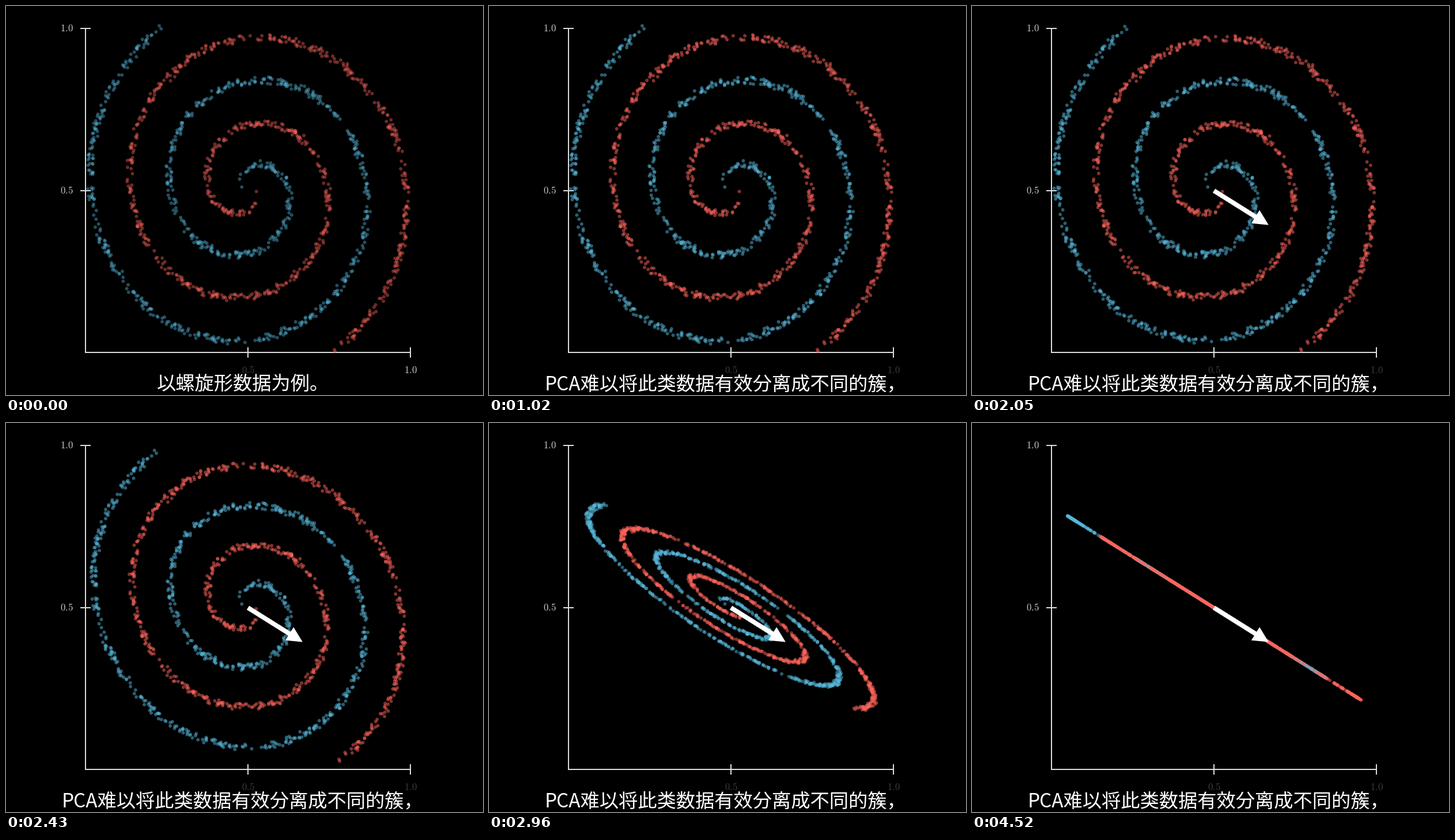
Recreate the animation shown at these times as a matplotlib script. Size 828x676 px, loop 4.58 s.

```python
import numpy as np
import matplotlib.pyplot as plt
from matplotlib.animation import FuncAnimation
from matplotlib.patches import Polygon, Rectangle

W, H, DPI = 828, 676, 64
LOOP, TICK = 4580, 20
PT = 72 / DPI                       # points per pixel
RED, BLUE = "#ff655c", "#58b8dc"
LINE = "#dedede"

plt.rcParams["mathtext.fontset"] = "cm"
fig = plt.figure(figsize=(W / DPI, H / DPI), dpi=DPI, facecolor="black")
ax = fig.add_axes([0, 0, 1, 1])
ax.set_xlim(0, W)
ax.set_ylim(H, 0)
ax.axis("off")

ORIGIN = np.array([420.0, 321.0])
AXIS = np.array([513.0, 322.0])
AXIS /= np.hypot(*AXIS)
NORMAL = np.array([-AXIS[1], AXIS[0]])


def smooth(t):
    """Sigmoid ease from 0 to 1."""
    t = min(max(t, 0.0), 1.0)
    edge = 1 / (1 + np.exp(5))
    return (1 / (1 + np.exp(-10 * (t - 0.5))) - edge) / (1 - 2 * edge)


def spirals(n, seed):
    """Two noisy spiral arms, one the half turn of the other."""
    rng = np.random.default_rng(seed)
    a = np.sqrt(rng.random(n)) * np.radians(780)
    arm = np.column_stack([a * np.cos(a), a * np.sin(a)])
    return [(sign * arm + rng.uniform(-0.25, 0.25, (n, 2))) * [21.8, 23.9]
            + [421, 318] for sign in (1, -1)]


def project(pts, p):
    """Move points the share p of the way onto the main axis."""
    off = (pts - ORIGIN) @ NORMAL
    return pts - p * off[:, None] * NORMAL


def stroke(x0, y0, x1, y1):
    ax.plot([x0, x1], [y0, y1], color=LINE, lw=2 * PT,
            solid_capstyle="projecting", zorder=1)


def label(x, y, s):
    ax.text(x, y, f"${s}$", color="#c8c8c8", fontsize=16.8 * PT,
            ha="center", va="center", zorder=1)


def subtitle(x, s, box_x0, box_x1):
    box = Rectangle((box_x0, 622), box_x1 - box_x0, H - 622,
                    fc="black", alpha=0.7, lw=0, zorder=5)
    ax.add_patch(box)
    text = ax.text(x, 667, s, color="white", fontsize=33.3 * PT,
                   family="Noto Sans CJK JP", va="baseline", zorder=6)
    return box, text


stroke(138, 39, 138, 602)
stroke(138, 602, 702, 602)
for v, s in ((0.5, "0.5"), (1.0, "1.0")):
    x, y = 138 + 564 * v, 602.5 - 563.5 * v
    stroke(130, y, 146, y)
    stroke(x, 594, x, 610)
    label(105, y, s)
    label(x, 632.5, s)

red, blue = spirals(750, 11)
sizes = np.full(len(red), (6 * PT) ** 2)
dots = [(pts, ax.scatter(*pts.T, s=sizes, c=color, lw=0, zorder=z))
        for pts, color, z in ((blue, BLUE, 2), (red, RED, 3))]

# Arrow outline as (along, across) the axis
ARROW = np.array([(0, -4), (85, -4), (85, -13.5), (112, 0),
                  (85, 13.5), (85, 4), (0, 4)])
arrow = Polygon(ORIGIN + ARROW @ [AXIS, NORMAL], fc="white", lw=0, zorder=4)
ax.add_patch(arrow)

first = subtitle(262, "以螺旋形数据为例。", 252, 576)
second = subtitle(97, "PCA难以将此类数据有效分离成不同的簇，", 86, 738)


def update(i):
    step = int((i * TICK + 12) / 128.5)     # the picture holds between steps
    t = step * 129

    p = smooth((t - 1785) / 1900)
    alpha = 0.42 + 0.08 * min(t / 900, 1)
    for pts, cloud in dots:
        cloud.set_offsets(project(pts, p))
        cloud.set_alpha(alpha)

    grow = smooth((t - 1100) / 700)
    arrow.set_visible(grow > 0)
    arrow.set_xy(ORIGIN + grow * ARROW @ [AXIS, NORMAL])

    for part in first:
        part.set_visible(step < 3)
    for part in second:
        part.set_visible(step >= 7)
    return []


anim = FuncAnimation(fig, update, frames=LOOP // TICK, interval=TICK,
                     repeat=True, repeat_delay=0, blit=False)
plt.show()
```
